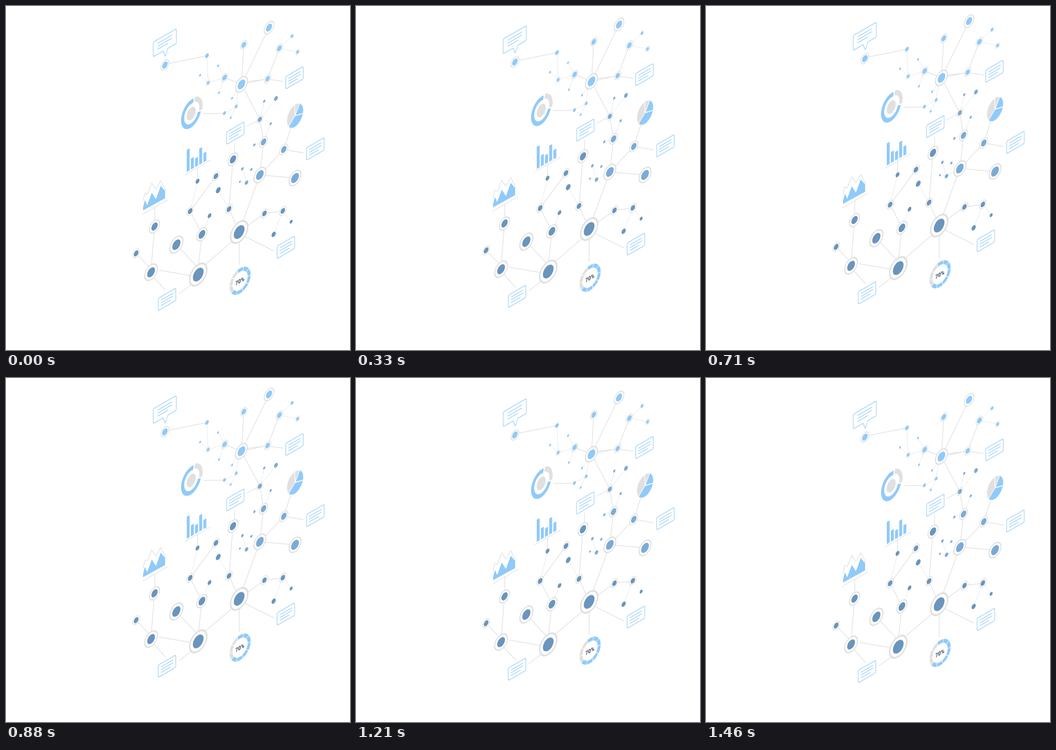
These frames come from a looping animation (748x748 px, 1.5 s). An HTML page:

```html
<!DOCTYPE html>
<html lang="en">
<head>
<meta charset="utf-8">
<title>Data network</title>
<style>
  html, body { margin: 0; width: 100%; height: 100%; overflow: hidden; background: #fff; }
  svg { display: block; width: 100vw; height: 100vh; }
  /* 24 steps per second, rising 15px and sinking again */
  #net { animation: bob 1500ms steps(18) -5ms infinite; }
  @keyframes bob {
    0% { transform: translateY(0); }
    49.999% { transform: translateY(-15px); }
    50% { transform: translateY(-13.86px); }
    100% { transform: translateY(1.14px); }
  }
  .line { fill: none; stroke: #e0e0e0; stroke-width: 1.4; }
  .thin { stroke-width: .8; }
  .blue { fill: #90caf9; }
  .gray { fill: #e0e0e0; }
  .note { fill: #fff; stroke: #90caf9; stroke-width: 1.35; stroke-linecap: round; stroke-linejoin: round; }
  .ring { fill: #fff; stroke: #dfdfdf; }
  .cut { stroke: #fff; stroke-width: 2; }
  text { font: 700 12px Roboto, sans-serif; fill: #2c3e50; text-anchor: middle; }
</style>
</head>
<body>
<svg viewBox="0 0 748 748">
  <g id="net">
    <g class="line">
      <path d="M345.5 126.500L437 108M517 84.500L512 170.500L572 47M475.500 155.500L512 170.500L569 158L594.500 92M512 166L569 159L603 164M512 170.500L552 246.500L523 262M430 234L475 233.500"/>
      <path d="M552 246.500L560 295.500L552 367.500L604 312L619 266M604 312L647 319.500M552 367.500L628.500 374M552 367.500L507 491"/>
      <path d="M497 298V320M493.500 333.500L485 441.500L507 491L562 451L602 446M582 532.500L507 495V563M507 499L418 575M370.500 519L418 570L426 496.500L400.500 446L456.500 370"/>
      <path d="M333 574.500L403 586.500M376 626L406 603M347 618.500L315.500 583M283 538L315.500 572L323 479.500M323.500 437V468M416.500 351V381"/>
    </g>
    <g class="line thin">
      <path d="M437 108L439.500 167L475.500 155.500L461 130M422 150.500L439.500 167M475.500 155.500L463 188.500M622 65.500L594.500 92L634 100M512 170.500L491.500 200.500M505 184L500.500 218.500L475 233M500.500 218.500L488.500 243"/>
      <path d="M587 201L552 246.500L561.500 207M575.500 256L560 295.500L540 302M533.500 355.500L552 367.500L523 384L514 354M523 384L508.500 382"/>
      <path d="M416.500 381L400.500 446M442.500 456L426 496.500M461.500 400.500L485 441.500M620 469L602 445.500L582 496.500"/>
    </g>
    <g id="nodes"></g>
    <g id="notes"></g>
    <g id="bars" class="blue" transform="matrix(1 -.577 0 1 393 361)"></g>
    <path class="line" d="M388.500 367.500L445 335M296 453.500L352.500 421"/>
    <path class="line" d="M298 424L302 407L307 410L317 385.500L326 398.500L336.500 380L346 398.500V403"/>
    <path class="blue" d="M298 444.500V438L302 422L307 433L317 406L326 420L336.500 391L346 402.500V418Z"/>
    <g id="charts"></g>
    <text transform="matrix(.866 -.5 0 1 508.500 598)" y="4.300">70%</text>
  </g>
</svg>
<script>
const NS = 'http://www.w3.org/2000/svg';
const $ = id => document.getElementById(id);

function add(parent, tag, attrs) {
  const el = document.createElementNS(NS, tag);
  for (const key in attrs) el.setAttribute(key, attrs[key]);
  return parent.appendChild(el);
}

// Plane turned to the left, as in an isometric view
const plane = (x, y, a = .866) => `matrix(${a} -.5 0 1 ${x} ${y})`;

// Rows: x, y, core radius, optional ring radius
function drawNodes(fill, rows) {
  for (const [x, y, core, ring] of rows) {
    const g = add($('nodes'), 'g', { transform: plane(x, y) });
    if (ring) {
      const w = ring * .15;
      add(g, 'circle', { class: 'ring', r: ring - w / 2, 'stroke-width': w });
    }
    add(g, 'circle', { r: core, fill });
  }
}

drawNodes('#90caf9', [
  [572, 47, 7.8, 13.3], [517, 84.5, 6, 9.3], [594.5, 92, 6, 9.3],
  [634, 100, 3.7, 6.2], [622, 65.5, 3.7], [569, 158, 5.6, 9.1],
  [512, 170.5, 9.6, 16.3], [475.5, 155.5, 5.8, 9], [439.5, 167, 3.7, 6.2],
  [437, 108, 4.6], [345.5, 128.5, 7, 11], [422, 150.5, 2.6],
  [461, 130, 2.6], [463, 188.5, 2.6], [491.5, 200.5, 2.6],
  [500.5, 218.5, 3.7], [475, 233, 3.7], [488.5, 243, 2.6]
]);
drawNodes('#7babd5', [
  [587, 201, 4.7], [561.5, 207, 2.8], [552, 246.5, 5.2, 8.2],
  [575.5, 256, 2.8], [560, 295.5, 6.9, 11.3], [540, 302, 2.8],
  [604, 312, 6.9, 11.3], [552, 367.5, 9.6, 16.3], [628.5, 374, 9.8, 16.3],
  [533.5, 355.5, 2.8], [514, 354, 3.2], [508.5, 382, 2.2], [523, 384, 4.3]
]);
drawNodes('#6a95bc', [
  [493.5, 333.5, 8, 13.6], [485, 441.5, 5.8, 9.5], [461.5, 400.5, 6],
  [456.5, 370, 5.8, 9.5], [416.5, 381, 4.8], [400.5, 446, 5.8, 9.5],
  [442.5, 456, 4.6], [426, 496.5, 8.5, 14], [370.5, 519, 10.3, 17.8],
  [418, 584, 13.5, 23.3], [315.5, 579, 9.8, 17.3], [283, 538, 6, 9.5],
  [323, 479.5, 8, 14], [507, 491.5, 13.5, 23.2], [562, 451, 5.6, 9.5],
  [602, 445.5, 5.6, 9.5], [620, 469, 3.7], [582, 496.5, 5.3]
]);

function drawNote(x, y, frame, lines) {
  const g = add($('notes'), 'g', { class: 'note', transform: plane(x, y) });
  add(g, 'path', { d: frame });
  add(g, 'path', { d: lines });
}

const card = 'M-19 -13.500H19Q22 -13.500 22 -10.500V10.500Q22 13.500 19 13.500H-19Q-22 13.500 -22 10.500V-10.500Q-22 -13.500 -19 -13.500Z';
const cardLines = 'M-15 -6H15M-15 0H15M-15 6H8';
for (const [x, y] of [[627.3, 156], [672.7, 310.7], [498.6, 276.5], [608.6, 524.7], [350.2, 638]])
  drawNote(x, y, card, cardLines);
drawNote(345.3, 80,
  'M-26 -16H26Q29 -16 29 -13V13Q29 16 26 16H7.500L2.200 28.500Q1.400 30.500 .6 28.500L-4.400 16H-26Q-29 16 -29 13V-13Q-29 -16 -26 -16Z',
  'M-17.500 -7.800H17.500M-17.500 -1.300H17.500M-17.500 5.200H8');

[48, 24, 19, 35, 20].forEach((h, i) =>
  add($('bars'), 'rect', { x: i * 9.05, y: -h, width: 6.4, height: h }));

// Sector between two angles in degrees, clockwise from the right
function sector(g, cls, r0, r1, from, to) {
  const at = (r, deg) => {
    const a = deg * Math.PI / 180;
    return `${r * Math.cos(a)} ${r * Math.sin(a)}`;
  };
  const big = to - from > 180 ? 1 : 0;
  add(g, 'path', {
    class: cls,
    d: `M${at(r1, from)}A${r1} ${r1} 0 ${big} 1 ${at(r1, to)}L${at(r0, to)}A${r0} ${r0} 0 ${big} 0 ${at(r0, from)}Z`
  });
}

const chart = (x, y, a) => add($('charts'), 'g', { transform: plane(x, y, a) });

const donut = chart(402.7, 234, .73);
sector(donut, 'blue', 21, 30.2, 18, 285);
add(donut, 'circle', { class: 'gray', r: 13.4 });
sector(chart(405.6, 230.6, .73), 'gray', 20.5, 30.2, -75, 18);

const pie = chart(628.6, 238.5, .74);
const stops = [16, 143, 267, 305, 376];
['blue', 'gray', 'gray', 'blue'].forEach((c, i) =>
  sector(pie, c, .01, 23.8, stops[i], stops[i + 1]));
for (const deg of stops.slice(0, 4))
  add(pie, 'line', { class: 'cut', x2: 25, transform: `rotate(${deg})` });

const gauge = chart(509, 597.5, .84);
for (let i = 0; i < 10; i++)
  sector(gauge, i < 7 ? 'blue' : 'gray', 19.8, 27.4, i * 36 - 104.5, i * 36 - 71.5);
</script>
</body>
</html>
```
